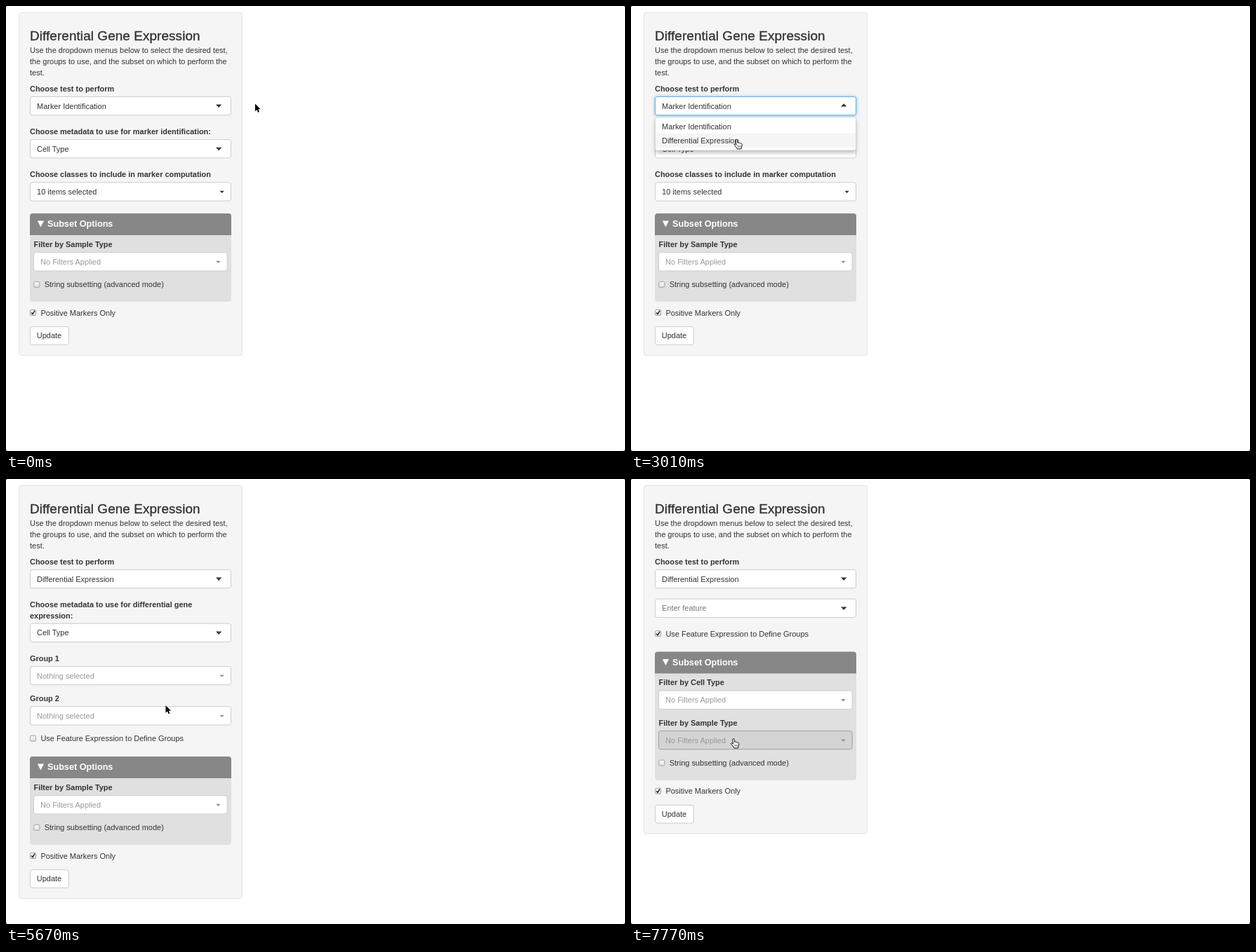
An HTML page for the animation above (8000 ms loop, 882 by 635 pixels).

```html
<!DOCTYPE html>
<html lang="en">
<head>
<meta charset="utf-8">
<title>Differential Gene Expression</title>
<style>
html, body { margin: 0; width: 100%; height: 100%; overflow: hidden; background: #fff; }
svg { display: block; }
text { font: 10.97px "Liberation Sans", Arial, sans-serif; fill: #333; white-space: pre; }
.bold { font-weight: bold; font-size: 10.93px; }
.title { font-size: 18.9px; letter-spacing: .09px; stroke: #333; stroke-width: .35px; }
.head { font-weight: bold; font-size: 12.65px; fill: #fff; }
.mute { fill: #999; }
.hint { fill: #777; }
</style>
</head>
<body>
<svg id="stage" width="882" height="635" viewBox="0 0 882 635">
  <defs>
    <filter id="glow" x="-10%" y="-60%" width="120%" height="220%"><feGaussianBlur stdDeviation="2"/></filter>
    <filter id="shade" x="-10%" y="-40%" width="120%" height="200%"><feGaussianBlur stdDeviation="3.2"/></filter>
    <linearGradient id="tick" x2="0" y2="1"><stop stop-color="#fafafa"/><stop offset="1" stop-color="#dedede"/></linearGradient>
  </defs>
  <path d="M0 0H2L0 2ZM882 0V2L880 0ZM0 635V632.5L2.5 635ZM882 635H879.5L882 632.5Z" fill="#888"/>
  <g id="form"></g>
  <g id="pointer"></g>
</svg>
<script>
const LOOP = 8000, STEP = 70;
const form = document.getElementById('form');
const pointer = document.getElementById('pointer');

const smooth = u => u * u * (3 - 2 * u);
const easeOut = u => 1 - Math.pow(1 - u, 1.7);

// Pointer moves: start, end, x and y at the end, easing
const home = [355, 139.5];
const moves = [
  [0, 140, 351, 140, smooth],
  [210, 1050, 310.5, 133.5, smooth],
  [1050, 1120, 309, 134, smooth],
  [1330, 1400, 307.5, 134, smooth],
  [1960, 2730, 158, 187.8, smooth],
  [2730, 2870, 150.5, 190.5, smooth],
  [4200, 4270, 151, 189, smooth],
  [4270, 4410, 148.5, 190, smooth],
  [4480, 5320, 335.5, 253, smooth],
  [5320, 6160, 155.5, 369.5, easeOut],
  [6160, 6300, 146, 370.5, smooth]
];

function place(t) {
  let [x, y] = home;
  for (const [a, b, x2, y2, ease] of moves) {
    if (t <= a) break;
    const u = ease(Math.min(1, (t - a) / (b - a)));
    x += (x2 - x) * u;
    y += (y2 - y) * u;
  }
  return [x, y];
}

const text = (x, y, s, cls = '') => `<text x="${x}" y="${y}" class="${cls}">${s}</text>`;

const rect = (x, y, w, h, fill, stroke = 'none', r = 3) =>
  `<rect x="${x}" y="${y}" width="${w}" height="${h}" rx="${r}" fill="${fill}" stroke="${stroke}"/>`;

const shape = (d, fill) => `<path d="${d}" fill="${fill}"/>`;

function select(y, value, { cls = '', open = false } = {}) {
  const glow = open
    ? `<rect x="33.5" y="${y - .5}" width="288" height="28" rx="4" fill="#66afe9" opacity=".75" filter="url(#glow)"/>` : '';
  const caret = open ? `M299 ${y + 14.2}h8.4l-4.2 -4.3z` : `M299 ${y + 11.2}h8.4l-4.2 4.5z`;
  return glow + rect(34.5, y, 286, 26.3, '#fff', open ? '#66afe9' : '#ccc') +
    text(44, y + 17.2, value, cls) + shape(caret, '#333');
}

// state: 0 normal, 1 hovered, 2 pressed
function picker(x, y, w, value, { cls = 'mute', state = 0 } = {}) {
  const fill = ['#fff', '#e6e6e6', '#d4d4d4'][state];
  const line = ['#ccc', '#adadad', '#a0a0a0'][state];
  return rect(x, y, w, 26.3, fill, line) + text(x + 9.6, y + 17.3, value, cls) +
    shape(`M${x + w - 16} ${y + 12}h6.4l-3.2 3.3z`, cls ? '#8f8f8f' : '#333');
}

function check(x, y, label, on) {
  const mark = on
    ? `<path d="M${x + 2} ${y + 4.3}l1.8 2.1l3.1 -5" fill="none" stroke="#222" stroke-width="1.5"/>` : '';
  return rect(x + .3, y + .3, 8, 8, 'url(#tick)', '#a3a3a3', 1.5) + mark + text(x + 15.2, y + 8.3, label);
}

// Everything from the subset header down to the button
function lower(y, featured, state) {
  const gap = featured ? 57.3 : 0;
  const s = y + gap;
  let out = rect(34, y, 287, 126 + gap, '#e0e0e0', 'none', 4) +
    shape(`M34 ${y + 31}V${y + 4}q0 -4 4 -4H317q4 0 4 4V${y + 31}Z`, '#878787') +
    shape(`M44.8 ${y + 10.6}h9.2l-4.6 9z`, '#fff') + text(59, y + 19.4, 'Subset Options', 'head');
  if (featured) {
    out += text(39.5, y + 48, 'Filter by Cell Type', 'bold') + picker(39.5, y + 55.7, 275.7, 'No Filters Applied');
  }
  return out + text(39.5, s + 48, 'Filter by Sample Type', 'bold') +
    picker(39.5, s + 55.7, 275.7, 'No Filters Applied', { state }) +
    check(39.5, s + 97.1, 'String subsetting (advanced mode)', false) +
    check(34.2, s + 137.2, 'Positive Markers Only', true) +
    rect(34.5, s + 161.6, 54.8, 25.8, '#fff', '#ccc') + text(43.8, s + 178.2, 'Update');
}

function menu(hot, caret) {
  const row = hot ? 182 : 162;
  return '<rect x="35" y="163" width="285" height="46" fill="#000" opacity=".3" filter="url(#shade)"/>' +
    rect(34.5, 158.5, 286, 47.5, '#fff', '#d4d4d4', 2) +
    rect(35, row, 285, 20, '#f5f5f5', 'none', 0) +
    text(44, 176, 'Marker Identification') + text(44, 196.1, 'Differential Expression') +
    (caret ? '<path d="M143.8 136.5V148.5" stroke="#333"/>' : '');
}

function drawForm(t, y) {
  const within = (a, b) => t >= a && t < b;
  const mode = t < 3500 ? 0 : t < 3570 ? 1 : t < 7700 ? 2 : 3;
  const open = within(1400, 3430);
  const top = [296, 380.4, 396, 246.4][mode];
  const gap = mode === 3 ? 57.3 : 0;

  let out = rect(18.5, 9.5, 318, top + gap + 193, '#f5f5f5', '#e3e3e3') +
    text(34, 48.9, 'Differential Gene Expression', 'title') +
    text(34, 67.4, 'Use the dropdown menus below to select the desired test,') +
    text(34, 83, 'the groups to use, and the subset on which to perform the') +
    text(34, 98.6, 'test.') +
    text(34, 121.8, 'Choose test to perform', 'bold') +
    select(129.4, t < 3430 ? 'Marker Identification' : 'Differential Expression', { open });

  if (mode === 3) {
    out += select(171.2, 'Enter feature', { cls: 'hint' }) +
      check(34.2, 216.4, 'Use Feature Expression to Define Groups', true);
  } else {
    const d = mode === 2 ? 15.6 : 0;
    out += text(34, 183, d ? 'Choose metadata to use for differential gene' : 'Choose metadata to use for marker identification:', 'bold') +
      (d ? text(34, 198.6, 'expression:', 'bold') : '') +
      select(190.6 + d, 'Cell Type');
    if (mode === 0) {
      out += text(34, 244, 'Choose classes to include in marker computation', 'bold') +
        picker(34.5, 251.8, 286, '10 items selected', { cls: '' });
    } else {
      out += text(34, 244 + d, 'Group 1', 'bold') +
        picker(34.5, 251.8 + d, 286, 'Nothing selected', { state: +within(5460, 5530) }) +
        text(34, 301.4 + d, 'Group 2', 'bold') +
        picker(34.5, 309.1 + d, 286, 'Nothing selected', { state: +within(5740, 5950) }) +
        check(34.2, 350.3 + d, 'Use Feature Expression to Define Groups', false);
    }
  }
  out += lower(top, mode === 3, t >= 7770 ? 2 : 0);
  if (open) out += menu(y > 182, within(1400, 1960) || within(2450, 3010));
  return out;
}

const glyphs = {
  arrow: '<path d="M0 0V10.8L2.5 8.5L4.1 12.4L5.9 11.6L4.3 7.8H7.6Z" fill="#000" stroke="#fff" stroke-width="1.2" paint-order="stroke"/>',
  hand: '<path d="M-1.2 1C-1.2 -.4 1.2 -.4 1.2 1L1.6 4.8C2 4.1 3.6 4.3 3.8 5.3C4.4 4.6 5.8 4.9 6 6C6.8 5.5 7.8 6 7.8 7.2L7.6 9.5L6.6 11.5V13.4H.6V12.4L-1.8 9.5L-3.4 7.6C-4 6.4 -2.6 5.8 -1.8 6.6L-.6 7.8Z" fill="#fff" stroke="#111" stroke-linejoin="round"/>' +
    '<path d="M2 8.6V11.2M3.7 8.6V11.2M5.4 8.6V11.2" stroke="#333" stroke-width=".7"/>',
  beam: ['#fff" stroke-width="2.2', '#111" stroke-width="1'].map(s =>
    `<path d="M-3 -6Q0 -6 0 -4V4Q0 6 -3 6M3 -6Q0 -6 0 -4M0 4Q0 6 3 6M-1.6 2H1.6" fill="none" stroke="${s}"/>`).join('')
};

function glyphAt(t, y) {
  if (t < 1120) return 'arrow';
  if (t < 1400) return 'hand';
  if (t < 4270) return y < 158 ? 'beam' : 'hand';
  if (t < 5320) return y > 207 && y < 232 ? 'hand' : 'arrow';
  return t >= 5740 && t < 5950 || t >= 6090 ? 'hand' : 'arrow';
}

function drawPointer(t, x, y) {
  const press = [1120, 3360, 7560].find(a => t >= a && t < a + (a === 1120 ? 280 : 140));
  const ring = press === undefined ? ''
    : `<circle r="16" fill="none" stroke="#444" stroke-width="1.6" opacity="${Math.min(.7, .35 + (t - press) / 280)}"/>`;
  return `<g transform="translate(${x.toFixed(2)} ${y.toFixed(2)})">${ring}${glyphs[glyphAt(t, y)]}</g>`;
}

let last = -1;
function draw(now) {
  const t = Math.floor((now % LOOP) / STEP) * STEP;
  if (t !== last) {
    last = t;
    const [x, y] = place(t);
    form.innerHTML = drawForm(t, y);
    pointer.innerHTML = drawPointer(t, x, y);
  }
}

let start = null;
function tick(now) {
  if (start === null) start = now;
  draw(now - start);
  requestAnimationFrame(tick);
}
draw(0);
requestAnimationFrame(tick);
</script>
</body>
</html>
```
